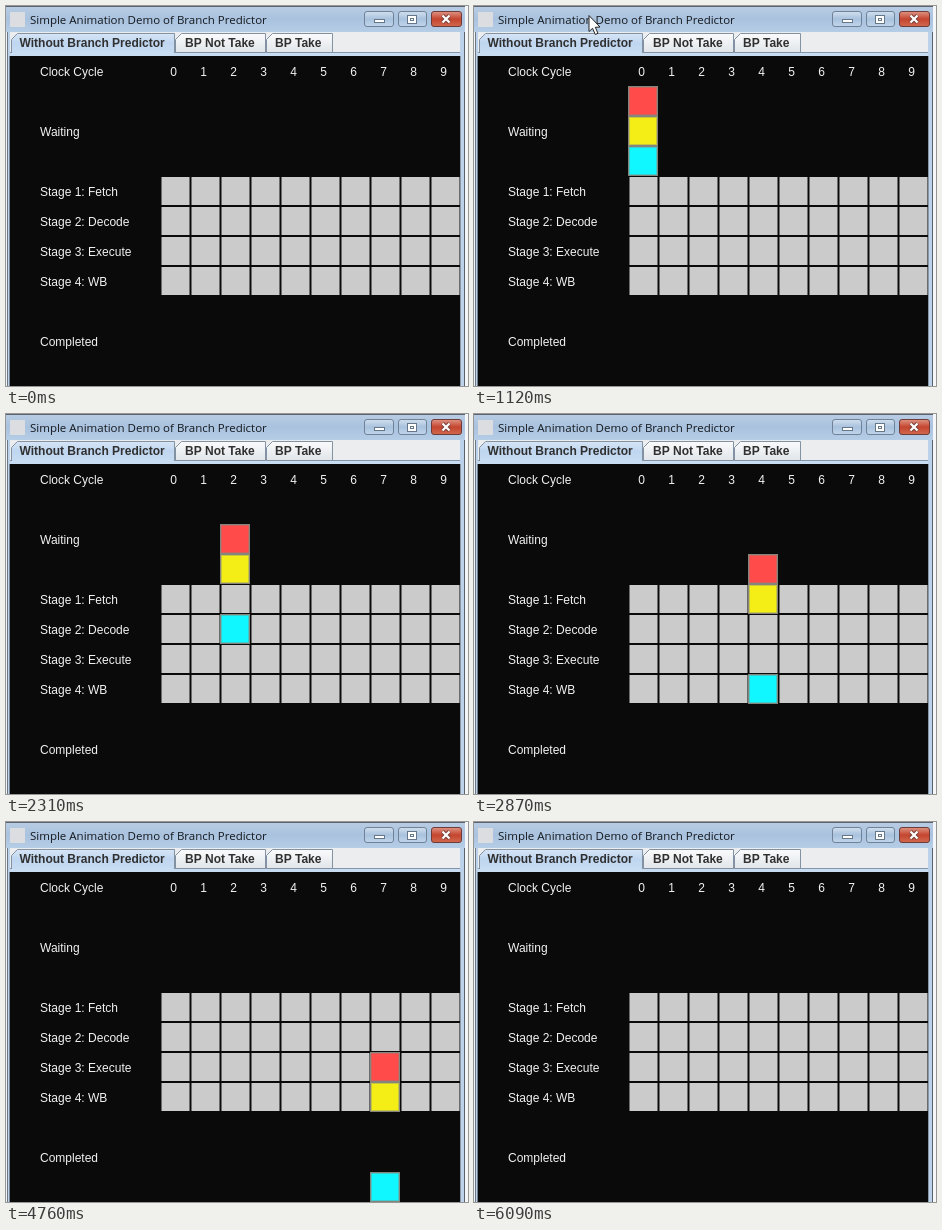
Write an HTML page with a canvas that moves like this. It is 462x380 px and loops after 6230 ms.

```html
<!DOCTYPE html>
<html lang="en">
<head>
<meta charset="utf-8">
<title>Branch predictor demo</title>
<style>
html, body { margin: 0; width: 100%; height: 100%; overflow: hidden; background: #0a0a0a; }
canvas { display: block; width: 462px; height: 380px; }
</style>
</head>
<body>
<canvas id="stage" width="462" height="380"></canvas>
<script>
const ctx = document.getElementById('stage').getContext('2d');
const LOOP = 6230, TICK = 70;
const START = 870, CYCLE = 500;      // first clock cycle and its length
const GRID_X = 155, PITCH = 30, WAIT_Y = 140;
const LABEL = '12px "Liberation Sans", Arial, sans-serif';
const BOLD = 'bold ' + LABEL;
const TITLE = '11.5px "Open Sans", "Noto Sans", sans-serif';

const TABS = [
  { text: 'Without Branch Predictor', x: 5, end: 169, textX: 13.5 },
  { text: 'BP Not Take', x: 169, end: 260, textX: 179 },
  { text: 'BP Take', x: 260, end: 327, textX: 269 }
];

const LABELS = [
  ['Clock Cycle', 70], ['Waiting', 130], ['Stage 1: Fetch', 190], ['Stage 2: Decode', 220],
  ['Stage 3: Execute', 250], ['Stage 4: WB', 280], ['Completed', 340]
];

// Row is counted from the waiting slot just above the first stage.
const JOBS = [
  { color: '#ff4b4a', row: c => waitRow(c) - 2 },
  { color: '#f4ee16', row: c => waitRow(c) - 1 },
  { color: '#10f7ff', row: c => c }
];

// The queue stalls for two cycles while the branch is being resolved.
function waitRow(c) {
  return c < 2 ? c : Math.max(1, c - 2);
}

function rect(x, y, w, h, fill) {
  ctx.fillStyle = fill;
  ctx.fillRect(x, y, w, h);
}

function text(str, x, y, font, fill, align = 'left') {
  ctx.font = font;
  ctx.fillStyle = fill;
  ctx.textAlign = align;
  ctx.fillText(str, x, y);
}

function fade(y0, y1, ...colors) {
  const g = ctx.createLinearGradient(0, y0, 0, y1);
  colors.forEach((c, i) => g.addColorStop(i / (colors.length - 1), c));
  return g;
}

function poly(points, fill, stroke, close = true) {
  ctx.beginPath();
  points.forEach(([x, y]) => ctx.lineTo(x, y));
  if (close) ctx.closePath();
  ctx.fillStyle = fill;
  ctx.fill();
  ctx.strokeStyle = stroke;
  ctx.lineWidth = 1;
  ctx.stroke();
}

function windowButton(x, w, fill, stroke) {
  ctx.beginPath();
  ctx.roundRect(x + .5, 5.5, w, 15, 2.5);
  ctx.fillStyle = fill;
  ctx.fill();
  ctx.strokeStyle = stroke;
  ctx.lineWidth = 1;
  ctx.stroke();
}

function drawFrame() {
  rect(0, 0, 462, 380, '#bcd2ea');
  rect(0, 0, 462, 26, fade(0, 26, '#b9cde4', '#a9c2de', '#b6cde6'));
  rect(0, 0, 462, 1, '#5c636b');
  rect(4, 6, 15, 15, '#dcdde0');
  text('Simple Animation Demo of Branch Predictor', 24, 18, TITLE, '#15191e');

  const glass = fade(5, 21, '#d3e1f0', '#a9c2dd', '#c2d7ec');
  windowButton(358, 29, glass, '#6f8297');
  windowButton(392, 28, glass, '#6f8297');
  windowButton(425, 30, fade(5, 21, '#e0998a', '#c5452f', '#d06c50'), '#6e3b38');

  ctx.strokeStyle = '#66778a';
  ctx.lineWidth = 1;
  ctx.fillStyle = '#fff';
  ctx.fillRect(368.5, 13.5, 10, 3);
  ctx.strokeRect(368.5, 13.5, 10, 3);
  ctx.fillRect(401.5, 9.5, 9, 8);
  ctx.strokeRect(401.5, 9.5, 9, 8);
  ctx.strokeRect(404.5, 12.5, 3, 2);

  for (const [width, color] of [[4, '#76413b'], [2.2, '#fff']]) {
    ctx.beginPath();
    ctx.moveTo(436.5, 9.5); ctx.lineTo(443.5, 16.5);
    ctx.moveTo(443.5, 9.5); ctx.lineTo(436.5, 16.5);
    ctx.lineWidth = width;
    ctx.strokeStyle = color;
    ctx.stroke();
  }
}

function drawTabs(active) {
  rect(4, 26, 450, 24, '#ebedef');
  rect(4, 46, 450, 4, '#c8ddf2');
  rect(4, 46, 450, 1, '#8395a6');
  TABS.forEach((tab, i) => {
    const on = i === active;
    const top = 27.5, left = tab.x + .5, right = tab.end - .5;
    const bottom = on ? 47 : 46.5;
    const fill = on ? fade(26, 48, '#dbe8f7', '#bfd6f0', '#c8ddf2')
                    : fade(27, 47, '#fafbfc', '#e1e5e9');
    poly([[left, bottom], [left, top + 6], [left + 6, top], [right, top], [right, bottom]],
         fill, '#8292a2', !on);
    text(tab.text, tab.textX, 41, BOLD, '#303030');
  });
  rect(TABS[active].x + 1, 46, TABS[active].end - TABS[active].x - 2, 2, '#c8ddf2');
}

function drawPanel() {
  rect(4, 50, 450, 330, '#0a0a0a');
  for (const [str, y] of LABELS) text(str, 34, y, LABEL, '#f2f2f2');
  for (let col = 0; col < 10; col++) {
    const x = GRID_X + col * PITCH;
    text(col, x + 12.7, 70, LABEL, '#f2f2f2', 'center');
    for (let row = 0; row < 4; row++) {
      rect(x + .5, 171 + row * PITCH, 28, 28, '#cbcbcb');
    }
  }
}

function drawJobs(t) {
  const cycle = Math.floor((t - START) / CYCLE);
  if (cycle < 0 || cycle > 9) return;
  const x = GRID_X + cycle * PITCH;
  for (const job of JOBS) {
    const y = WAIT_Y + job.row(cycle) * PITCH;
    rect(x - 1, y, 30, 30, '#85857d');
    ctx.globalAlpha = .6;
    rect(x, y + 1, 28, 28, job.color);
    ctx.globalAlpha = 1;
    rect(x + 1, y + 2, 26, 26, job.color);
  }
}

function drawBorder() {
  rect(0, 26, 1, 354, '#f0f4f8');
  rect(1, 26, 1, 354, '#6d7780');
  rect(3, 50, 1, 330, '#75828f');
  rect(454, 50, 1, 330, '#8a98a5');
  rect(458, 26, 1, 354, '#59626b');
  rect(459, 0, 3, 380, '#f4f6f8');
}

function drawCursor(t) {
  if (t < TICK || t >= 1260) return;
  const ease = p => { p = Math.min(1, Math.max(0, p)); return p * p * (3 - 2 * p); };
  const arrive = ease((t - 210) / 350), leave = ease((t - 980) / 280);
  const x = 290 - 190 * arrive + 30 * leave;
  const y = 100 - 58 * arrive - 65 * leave;
  const shape = [[0, 0], [0, 16], [3.6, 12.8], [6.3, 19], [9, 17.8], [6.3, 11.8], [11, 11.5]];
  poly(shape.map(([dx, dy]) => [x + dx, y + dy]), '#fff', '#222');
}

function draw(t) {
  drawFrame();
  drawTabs(t >= TICK && t < START ? 2 : 0);
  drawPanel();
  drawJobs(t);
  drawBorder();
  drawCursor(t);
}

const begin = performance.now();
function loop(now) {
  const t = Math.max(0, now - begin) % LOOP;
  draw(Math.floor(t / TICK) * TICK);
  requestAnimationFrame(loop);
}
draw(0);
requestAnimationFrame(loop);
</script>
</body>
</html>
```
